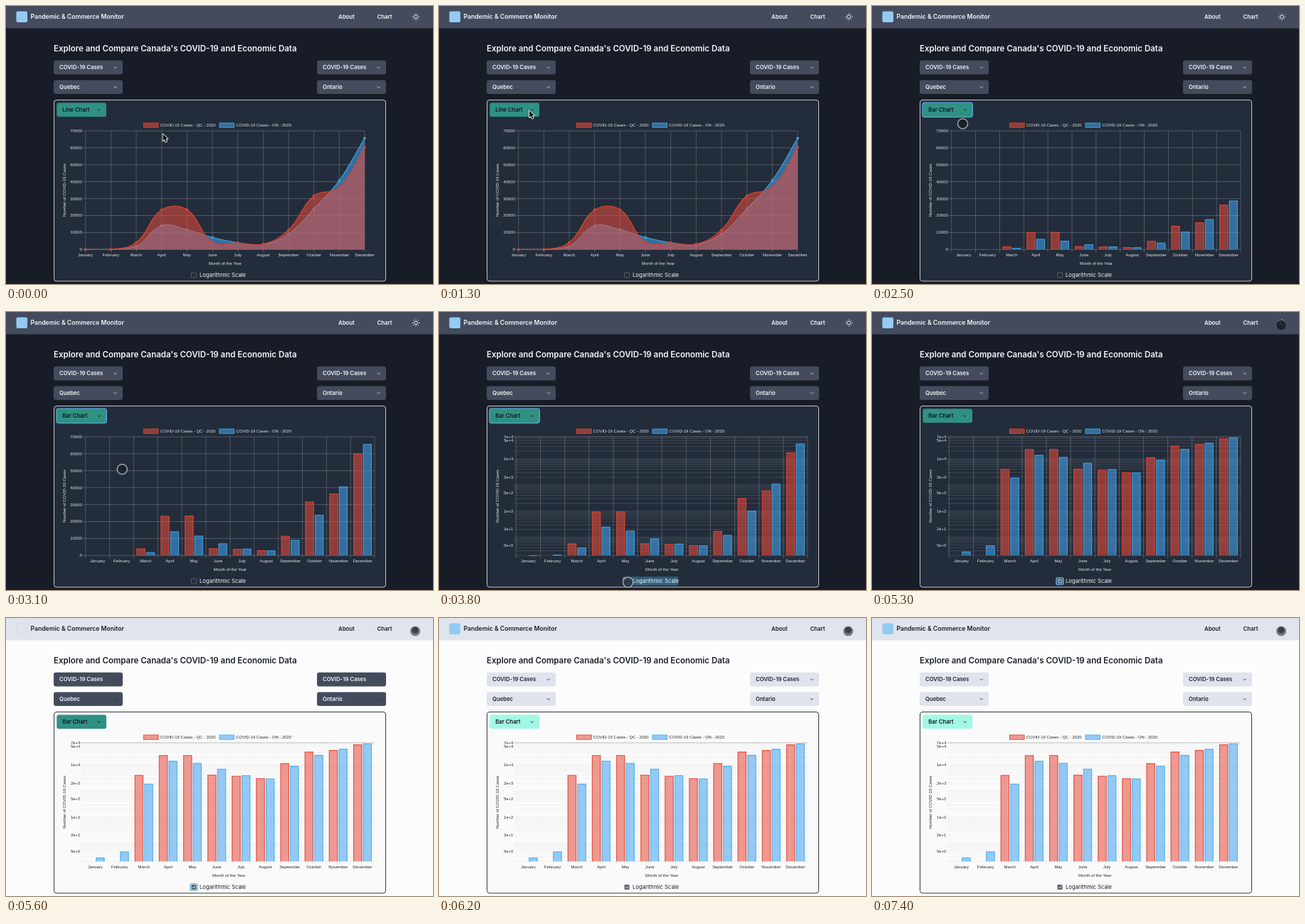
Write an HTML page with a canvas that moves like this. It is 600 by 392 pixels and loops after 7500 ms.

```html
<!DOCTYPE html>
<html lang="en">
<head>
<meta charset="utf-8">
<title>Pandemic &amp; Commerce Monitor</title>
<style>
  html, body { margin: 0; width: 100%; height: 100%; overflow: hidden; }
  canvas { display: block; width: 600px; height: 392px; }
</style>
</head>
<body>
<canvas id="stage"></canvas>
<script>
const LOOP = 7500, STEP = 100;
const BARS_AT = 2433, LOG_AT = 3792, LIGHT_AT = 5600, GROW = 500;
const TOP = 176, BASE = 343.3, MAX = 70000, LOG_MIN = 2;
const UI = 'Inter, "Open Sans", sans-serif';
const CHART = '5.9px "Liberation Sans", Arial, sans-serif';

const months = ['January', 'February', 'March', 'April', 'May', 'June', 'July',
  'August', 'September', 'October', 'November', 'December'];
const series = [
  { name: 'QC', data: [0, 0, 4050, 23350, 23500, 4200, 3750, 3080, 11500, 31700, 36500, 60200],
    fill: 'rgba(231,76,60,.55)', line: ['#d2432f', '#e2553f'], legendX: 193.5 },
  { name: 'ON', data: [2.8, 4.8, 1880, 14100, 11650, 7050, 3980, 2980, 9100, 24000, 40700, 65700],
    fill: 'rgba(66,165,240,.55)', line: ['#3f9ad7', '#5ab2ee'], legendX: 300 }
];
const themes = {
  dark: { page: '#181c27', header: '#434b5d', card: '#232c3a', border: '#c3c8d0', text: '#f2f4f7',
    label: '#e3e6eb', grid: 'rgba(255,255,255,.27)', minor: 'rgba(255,255,255,.2)',
    edge: 'rgba(255,255,255,.3)', column: 'rgba(255,255,255,.25)' },
  light: { page: '#fcfcfd', header: '#e0e4ed', card: '#fafafb', border: '#323844', text: '#1b202b',
    label: '#272a31', grid: 'rgba(0,0,0,.09)', minor: 'rgba(0,0,0,.07)',
    edge: 'rgba(0,0,0,.3)', column: 'rgba(0,0,0,.02)' }
};

// time, x, y of the pointer's hot spot
const pointerPath = [[0, 220.5, 180.5], [1000, 127, 147.5], [1900, 127, 147.5], [2400, 127.5, 166],
  [2850, 127.5, 166], [3600, 265.5, 381], [3900, 265.5, 381], [4300, 272, 377],
  [4450, 272, 377], [5250, 575, 18.5], [LOOP, 575, 18.5]];

const canvas = document.getElementById('stage');
const ctx = canvas.getContext('2d');
const ratio = window.devicePixelRatio || 1;
canvas.width = 600 * ratio;
canvas.height = 392 * ratio;

const clamp = (v, lo = 0, hi = 1) => Math.min(hi, Math.max(lo, v));
const mixNumber = (a, b, k) => a + (b - a) * k;
const easeOutQuart = p => 1 - (1 - clamp(p)) ** 4;
const linearY = v => BASE - (BASE - TOP) * v / MAX;
const logY = v => BASE - (BASE - TOP) * Math.log(Math.max(v, LOG_MIN) / LOG_MIN) / Math.log(MAX / LOG_MIN);

function mixColor(a, b, k) {
  const part = (c, i) => parseInt(c.slice(i, i + 2), 16);
  return `rgb(${[1, 3, 5].map(i => Math.round(mixNumber(part(a, i), part(b, i), k)))})`;
}

function text(str, x, y, color, font, align = 'left') {
  ctx.font = font;
  ctx.textAlign = align;
  ctx.textBaseline = 'middle';
  ctx.fillStyle = color;
  ctx.fillText(str, x, y);
}

function stroke(points, color, width = 1) {
  ctx.beginPath();
  points.forEach(([x, y]) => ctx.lineTo(x, y));
  ctx.strokeStyle = color;
  ctx.lineWidth = width;
  ctx.stroke();
}

function box(x, y, w, h, r, fill, line, width = 1) {
  ctx.beginPath();
  ctx.roundRect(x, y, w, h, r);
  if (fill) { ctx.fillStyle = fill; ctx.fill(); }
  if (line) { ctx.strokeStyle = line; ctx.lineWidth = width; ctx.stroke(); }
}

function disc(x, y, r, fill, line, width = 1) {
  box(x - r, y - r, 2 * r, 2 * r, r, fill, line, width);
}

function select(x, y, w, label, fill, color, chevron) {
  box(x, y, w, 19.6, 3, fill);
  text(label, x + 8, y + 10.2, color, `600 7.7px ${UI}`);
  const cx = x + w - 10.3, cy = y + 10;
  stroke([[cx - 2, cy - 1], [cx, cy + 1], [cx + 2, cy - 1]], chevron, 0.9);
}

function drawHeader(theme, light, fade) {
  ctx.fillStyle = theme.header;
  ctx.fillRect(0, 0, 600, 31.5);
  if (light) box(14.8, 7.8, 15, 15, 2, null, '#cfd5e0', 0.7);
  ctx.globalAlpha = light ? fade : 1;
  box(14.5, 7.5, 15.5, 15.5, 2, '#93cbf2');
  ctx.globalAlpha = 1;
  text('Pandemic & Commerce Monitor', 34.5, 15.8, theme.text, `600 8.65px ${UI}`);
  text('About', 467, 15.5, theme.text, `600 7.8px ${UI}`);
  text('Chart', 521.5, 15.5, theme.text, `600 7.8px ${UI}`);
  if (light) {
    disc(575, 17, 4.5, '#20242e');
    return;
  }
  disc(576, 15.3, 2.5, null, theme.text, 1);
  for (let i = 0; i < 8; i++) {
    const c = Math.cos(i * Math.PI / 4), s = Math.sin(i * Math.PI / 4);
    stroke([[576 + 4.1 * c, 15.3 + 4.1 * s], [576 + 5.4 * c, 15.3 + 5.4 * s]], theme.text, 0.9);
  }
}

function drawControls(t, theme, light, fade) {
  text("Explore and Compare Canada's COVID-19 and Economic Data", 67, 60.3, theme.text, `600 11.5px ${UI}`);
  const fill = mixColor('#434b5d', '#dfe3ec', fade);
  const color = mixColor('#f0f2f5', '#1e2430', fade);
  const chevron = light ? '#2a303c' : '#d5d9e0';
  [[67, 'Quebec'], [437, 'Ontario']].forEach(([x, province]) => {
    select(x, 76.8, 97, 'COVID-19 Cases', fill, color, chevron);
    select(x, 104.4, 97, province, fill, color, chevron);
  });

  box(67.5, 132.5, 466, 255.5, 3.5, theme.card, theme.border);
  select(71.3, 136.6, 69.7, t < BARS_AT ? 'Line Chart' : 'Bar Chart',
    mixColor('#2f9182', '#a2f8e3', fade), '#10161d', '#10161d');
  if (t >= 1500 && t < 4000) box(70.9, 136.2, 70.4, 20.4, 3.3, null, '#5ba9dd', 1.3);
}

function drawCheckbox(t, theme, light) {
  if (t >= 3700 && t < 4000) box(259, 373.3, 77, 12.5, 0, '#315e7d');
  const checked = t >= LOG_AT;
  if (checked && t < 5800) box(259, 374.6, 9.8, 9.8, 2, null, '#6fb3dd', 1.4);
  box(260.5, 376, 7, 7, 1, checked ? (light ? '#59636f' : '#7d9db4') : null,
    checked ? null : '#596272', 0.9);
  if (checked) stroke([[262.2, 379.6], [263.6, 381], [266, 377.9]], light ? '#ffffff' : '#1a202c', 1);
  text('Logarithmic Scale', 272, 379.7, theme.text, `400 7.7px ${UI}`);
}

function drawAxes(plot, theme) {
  const { left, right, step, isBar, isLog } = plot;
  for (let i = 0; i <= (isBar ? 12 : 11); i++) {
    const x = left + i * step;
    stroke([[x, TOP], [x, BASE + 4]], theme.column, 0.8);
  }
  months.forEach((month, i) =>
    text(month, left + (i + (isBar ? 0.5 : 0)) * step, 351.8, theme.label, CHART, 'center'));

  if (isLog) {
    for (let decade = 1; decade <= 1e4; decade *= 10) {
      for (let m = 1; m <= 9; m++) {
        const v = m * decade;
        if (v >= LOG_MIN && v < MAX) stroke([[left - 3, logY(v)], [right, logY(v)]], theme.minor, 0.6);
      }
    }
    stroke([[left - 3, TOP], [right, TOP]], theme.edge, 0.9);
    [7e4, 5e4, 1e4, 2e3, 500, 100, 20, 5].forEach(v =>
      text(v.toExponential(), left - 4.2, logY(v) + 0.3, theme.label, CHART, 'right'));
  } else {
    for (let v = 0; v <= MAX; v += 10000) {
      stroke([[left - 4.5, linearY(v)], [right, linearY(v)]], theme.grid, 0.8);
      text(v, left - 5, linearY(v) + 0.3, theme.label, CHART, 'right');
    }
  }

  text('Month of the Year', (left + right) / 2, 363.8, theme.label, CHART, 'center');
  ctx.save();
  ctx.translate(82.3, 259.7);
  ctx.rotate(-Math.PI / 2);
  text('Number of COVID-19 Cases', 0, 0, theme.label, CHART, 'center');
  ctx.restore();
}

// Smooth curve whose control points follow the neighbours' chord.
function traceCurve(points, tension = 0.4) {
  const handles = points.map((p, i) => {
    const a = points[i - 1] || p, b = points[i + 1] || p;
    const before = Math.hypot(p[0] - a[0], p[1] - a[1]);
    const after = Math.hypot(b[0] - p[0], b[1] - p[1]);
    const handle = share => [
      p[0] + share * (b[0] - a[0]),
      clamp(p[1] + share * (b[1] - a[1]), TOP, BASE)
    ];
    const unit = tension / (before + after);
    return { into: handle(-unit * before), out: handle(unit * after) };
  });
  ctx.moveTo(...points[0]);
  for (let i = 1; i < points.length; i++) {
    ctx.bezierCurveTo(...handles[i - 1].out, ...handles[i].into, ...points[i]);
  }
}

function drawLines(plot) {
  [...series].reverse().forEach(s => {
    const points = s.data.map((v, i) => [plot.left + i * plot.step, linearY(v)]);
    ctx.beginPath();
    traceCurve(points);
    ctx.lineTo(plot.right, BASE);
    ctx.lineTo(plot.left, BASE);
    ctx.fillStyle = s.fill;
    ctx.fill();
    ctx.beginPath();
    traceCurve(points);
    ctx.strokeStyle = s.line[0];
    ctx.lineWidth = 1.3;
    ctx.stroke();
    points.forEach(([x, y]) => disc(x, y, 1.9, s.line[0]));
  });
}

function drawBars(t, plot, light) {
  const grown = easeOutQuart((t - BARS_AT) / GROW);
  const toLog = easeOutQuart((t - LOG_AT) / GROW);
  const width = plot.step * 0.36;
  series.forEach((s, n) => s.data.forEach((v, i) => {
    const y = plot.isLog
      ? mixNumber(linearY(v), logY(v), toLog)
      : mixNumber(BASE, linearY(v), grown);
    if (BASE - y < 0.2) return;
    const x = plot.left + (i + 0.5 + (n ? 0.2 : -0.2)) * plot.step - width / 2;
    ctx.fillStyle = s.fill;
    ctx.fillRect(x, y, width, BASE - y);
    stroke([[x + 0.5, BASE], [x + 0.5, y + 0.5], [x + width - 0.5, y + 0.5], [x + width - 0.5, BASE]],
      s.line[+light], 1.1);
  }));
}

function drawChart(t, theme, light) {
  const isBar = t >= BARS_AT, isLog = t >= LOG_AT;
  const left = isLog ? 108.4 : 111.7, right = isBar ? 518 : 504;
  const plot = { left, right, isBar, isLog, step: (right - left) / (isBar ? 12 : 11) };

  series.forEach(s => {
    box(s.legendX, 165, 20.5, 6.2, 0, s.fill, s.line[+light], 1.1);
    text(`COVID-19 Cases - ${s.name} - 2020`, s.legendX + 23.2, 168.4, theme.label, CHART);
  });
  drawAxes(plot, theme);
  if (isBar) drawBars(t, plot, light);
  else drawLines(plot);
}

function drawPointer(t, light) {
  const next = Math.max(1, pointerPath.findIndex(p => p[0] > t));
  const [t0, x0, y0] = pointerPath[next - 1], [t1, x1, y1] = pointerPath[next];
  const p = clamp((t - t0) / (t1 - t0)), k = p * p * (3 - 2 * p);
  const x = mixNumber(x0, x1, k), y = mixNumber(y0, y1, k);

  if (t >= 1400) {
    if (light) disc(x, y, 6.6, 'rgba(70,74,84,.72)', 'rgba(110,114,124,.8)', 0.8);
    else if (t >= 4000) disc(x, y, 7, 'rgba(16,20,28,.8)', 'rgba(75,84,98,.8)', 1);
    else disc(x, y, 7, 'rgba(22,27,36,.7)', '#9ea3aa', 1.5);
    return;
  }
  const arrow = [[0, 0], [0, 9.6], [2.2, 7.6], [3.8, 11.2], [5.5, 10.4], [3.9, 7], [6.8, 6.8]];
  ctx.beginPath();
  arrow.forEach(([dx, dy]) => ctx.lineTo(x + dx, y + dy));
  ctx.closePath();
  ctx.lineJoin = 'round';
  ctx.strokeStyle = '#fff';
  ctx.lineWidth = 1.7;
  ctx.stroke();
  ctx.lineJoin = 'miter';
  ctx.fillStyle = '#080a0e';
  ctx.fill();
}

function draw(now) {
  const t = Math.floor(now % LOOP / STEP) * STEP;
  const light = t >= LIGHT_AT;
  const theme = light ? themes.light : themes.dark;
  const fade = clamp((t - LIGHT_AT) / 200);

  ctx.setTransform(ratio, 0, 0, ratio, 0, 0);
  ctx.fillStyle = theme.page;
  ctx.fillRect(0, 0, 600, 392);
  drawHeader(theme, light, fade);
  drawControls(t, theme, light, fade);
  drawChart(t, theme, light);
  drawCheckbox(t, theme, light);
  drawPointer(t, light);
}

const start = performance.now();
function tick() {
  draw(performance.now() - start);
  requestAnimationFrame(tick);
}
tick();
</script>
</body>
</html>
```
